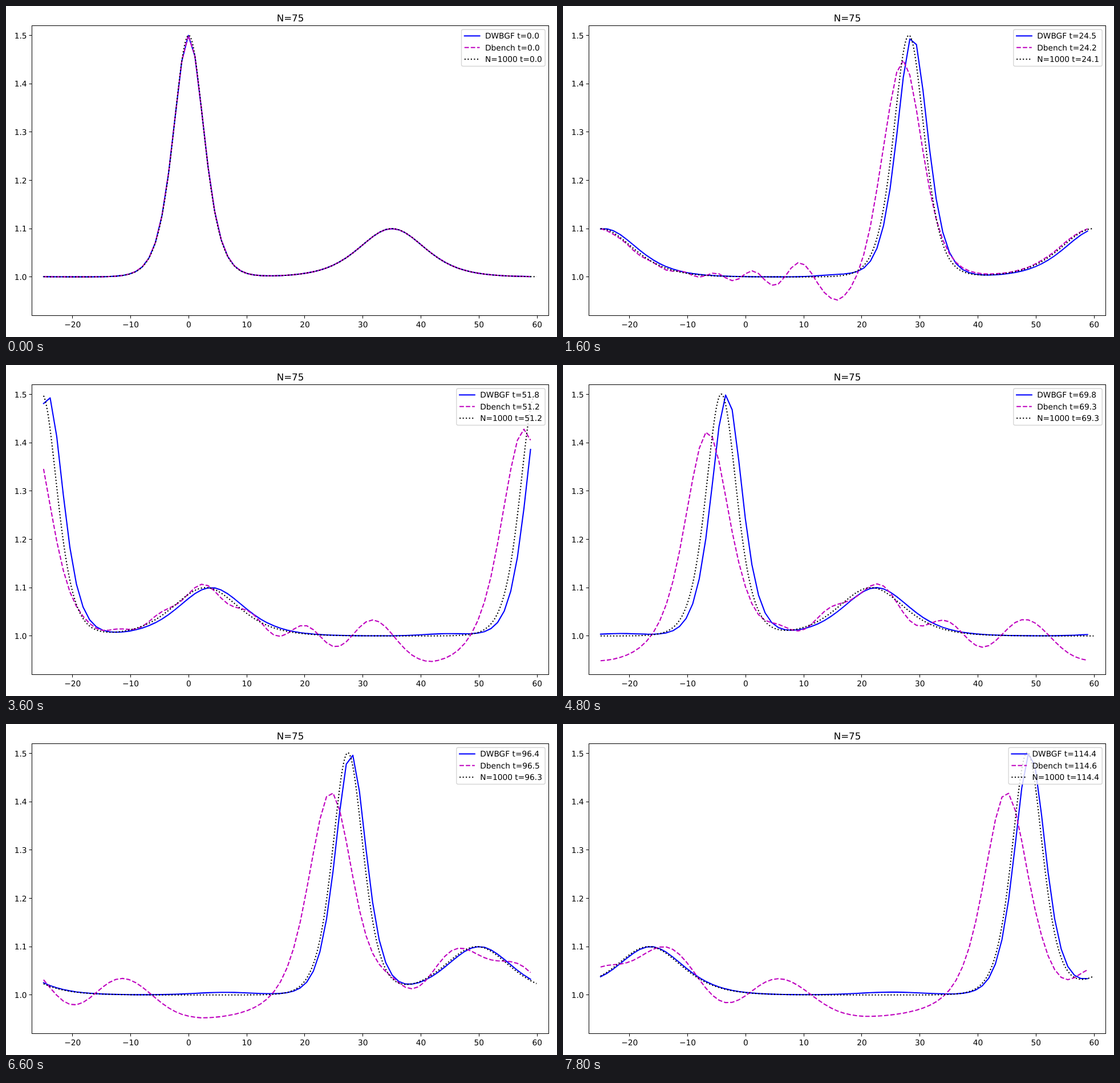
Write an HTML page with a canvas that moves like this. It is 966x580 px and loops after 8000 ms.

```html
<!DOCTYPE html>
<html lang="en">
<head>
<meta charset="utf-8">
<title>Travelling waves</title>
<style>
  html, body { margin: 0; width: 100%; height: 100%; overflow: hidden; background: #fff; }
  canvas { display: block; }
</style>
</head>
<body>
<canvas id="plot" width="966" height="580"></canvas>
<script>
const ctx = document.getElementById('plot').getContext('2d');
const FONT = '"DejaVu Sans", Verdana, sans-serif';
const BLUE = '#00f', MAGENTA = '#bf00bf', BLACK = '#000';
const DASHED = [7.71, 3.33], DOTTED = [2.08, 3.44];
const LINE = 2.083, LENGTH = 85, START = -25;
const FRAME_MS = 200, LOOP_MS = 8000;
const FINE_STEP = 3.01088, BLUE_STEP = 0.7197, BENCH_STEP = 0.16;
const box = { left: 45.5, right: 951.5, top: 34.5, bottom: 542.5 };

const toX = x => box.left + (x + 27) * (box.right - box.left) / 89;
const toY = y => box.bottom - (y - 0.92) * (box.bottom - box.top) / 0.6;
const wrap = (d, low) => ((d - low) % LENGTH + LENGTH) % LENGTH + low;
const centred = d => wrap(d, -LENGTH / 2);
const clamp = v => Math.min(1, Math.max(0, v));
const roundUp = (t, step) => Math.ceil(t / step) * step;

// Steepness 0 height travels at speed 1; taller solitons run faster
const soliton = (d, height, steepness) =>
  height / Math.cosh(steepness * centred(d)) ** 2;
const tall = d => soliton(d, 0.5, 0.284);
const low = d => soliton(d - 35, 0.1, 0.1315);

const fineWave = t => x => 1 + tall(x - 1.1667 * t) + low(x - 1.034 * t);

function blueWave(t) {
  const onset = clamp(t / 24);
  const peak = 1.17 * t + 0.07 * onset;
  const shelfAt = peak - 10 - 0.12 * t, width = 3.5 + 0.04 * t;
  const shelfHeight = onset * (0.0035 + 0.00002 * t);
  return x => 1 + tall(x - peak) + low(x - 1.034 * t - 0.3 * onset)
    + shelfHeight * Math.exp(-((centred(x - shelfAt) / width) ** 2));
}

// Chirped wave train behind the benchmark pulse; it spreads like sqrt(t)
function wakeHeight(d, t) {
  const front = 4, spread = Math.sqrt(t / 24.2);
  const trough = Math.max(front + 1, 11.2 * spread);
  const depth = clamp(t / 8) * (0.064 - 0.00017 * t);
  const behind = -wrap(d, front - LENGTH);
  if (depth === 0 || behind < front) return 0;
  if (behind < trough)
    return -depth * Math.sin(Math.PI / 2 * (behind - front) / (trough - front));
  const s = (behind - trough) / spread;
  const fade = clamp((LENGTH - front - behind) / 8);
  return -depth * fade * Math.exp(-s / (6 + 0.14 * t))
    * Math.cos(Math.PI * (s / 6.9) ** 1.43);
}

function benchWave(t) {
  const peak = 1.1317 * t - 0.3 * Math.sin(2 * Math.PI * t / 135);
  const height = 0.418 + 0.082 * Math.exp(-t / 24);
  const steepness = 0.204 + 0.08 * Math.exp(-t / 17);
  const lag = 0.4 * clamp(t / 24);
  return x => 1 + soliton(x - peak, height, steepness)
    + low(x - 1.034 * t + lag) + wakeHeight(x - peak, t);
}

function setLine(color, dash = [], width = LINE) {
  ctx.strokeStyle = color;
  ctx.lineWidth = width;
  ctx.lineJoin = 'round';
  ctx.lineCap = dash.length || width < LINE ? 'butt' : 'square';
  ctx.setLineDash(dash);
}

function drawWave({ wave, count, color, dash }) {
  setLine(color, dash);
  ctx.beginPath();
  for (let n = 0; n < count; n++) {
    const x = START + n * LENGTH / count;
    ctx.lineTo(toX(x), toY(wave(x)));
  }
  ctx.stroke();
}

function text(label, x, y, align, size = 13.75) {
  ctx.font = `${size}px ${FONT}`;
  ctx.textRendering = 'geometricPrecision';
  ctx.textAlign = align;
  ctx.fillStyle = BLACK;
  ctx.fillText(label, x, y);
}

function segment(x0, y0, x1, y1) {
  ctx.beginPath();
  ctx.moveTo(x0, y0);
  ctx.lineTo(x1, y1);
  ctx.stroke();
}

function drawAxes() {
  const snap = v => Math.floor(v) + 0.5;
  setLine(BLACK, [], 1);
  ctx.lineJoin = 'miter';
  ctx.strokeRect(box.left, box.top, box.right - box.left, box.bottom - box.top);
  for (let v = -20; v <= 60; v += 10) {
    const x = snap(toX(v));
    segment(x, box.bottom, x, box.bottom + 5);
    text(String(v).replace('-', '\u2212'), toX(v), 563, 'center');
  }
  for (let n = 10; n <= 15; n++) {
    const y = snap(toY(n / 10));
    segment(box.left - 5, y, box.left, y);
    text((n / 10).toFixed(1), 36.6, toY(n / 10) + 5.1, 'right');
  }
  text('N=75', 498.5, 26.5, 'center', 16.67);
}

function drawLegend(series) {
  const digits = Math.max(...series.map(s => s.time.toFixed(1).length)) - 3;
  const left = 798.5 - 8.7 * digits;
  ctx.beginPath();
  ctx.roundRect(left, 41.2, 945.2 - left, 64.3, 2.8);
  ctx.globalAlpha = 0.8;
  ctx.fillStyle = '#fff';
  ctx.fill();
  setLine('#ccc', [], 1.39);
  ctx.stroke();
  ctx.globalAlpha = 1;
  series.forEach(({ name, time, color, dash }, n) => {
    const y = 52.4 + 20.39 * n;
    setLine(color, dash);
    segment(left + 5.3, y, left + 32, y);
    text(`${name} t=${time.toFixed(1)}`, left + 41.4, y + 4.9, 'left');
  });
}

function draw(index) {
  // One additional snapshot is taken at t = 30
  const time = index < 10 ? index * FINE_STEP : Math.max(30, (index - 1) * FINE_STEP);
  const blueTime = roundUp(time, BLUE_STEP), benchTime = roundUp(time, BENCH_STEP);
  const series = [
    { name: 'DWBGF', time: blueTime, wave: blueWave(blueTime), count: 75, color: BLUE, dash: [] },
    { name: 'Dbench', time: benchTime, wave: benchWave(benchTime), count: 75, color: MAGENTA, dash: DASHED },
    { name: 'N=1000', time, wave: fineWave(time), count: 1000, color: BLACK, dash: DOTTED }
  ];
  ctx.fillStyle = '#fff';
  ctx.fillRect(0, 0, 966, 580);
  series.forEach(drawWave);
  drawAxes();
  drawLegend(series);
}

function tick() {
  draw(Math.floor(performance.now() % LOOP_MS / FRAME_MS));
  requestAnimationFrame(tick);
}
tick();
</script>
</body>
</html>
```
